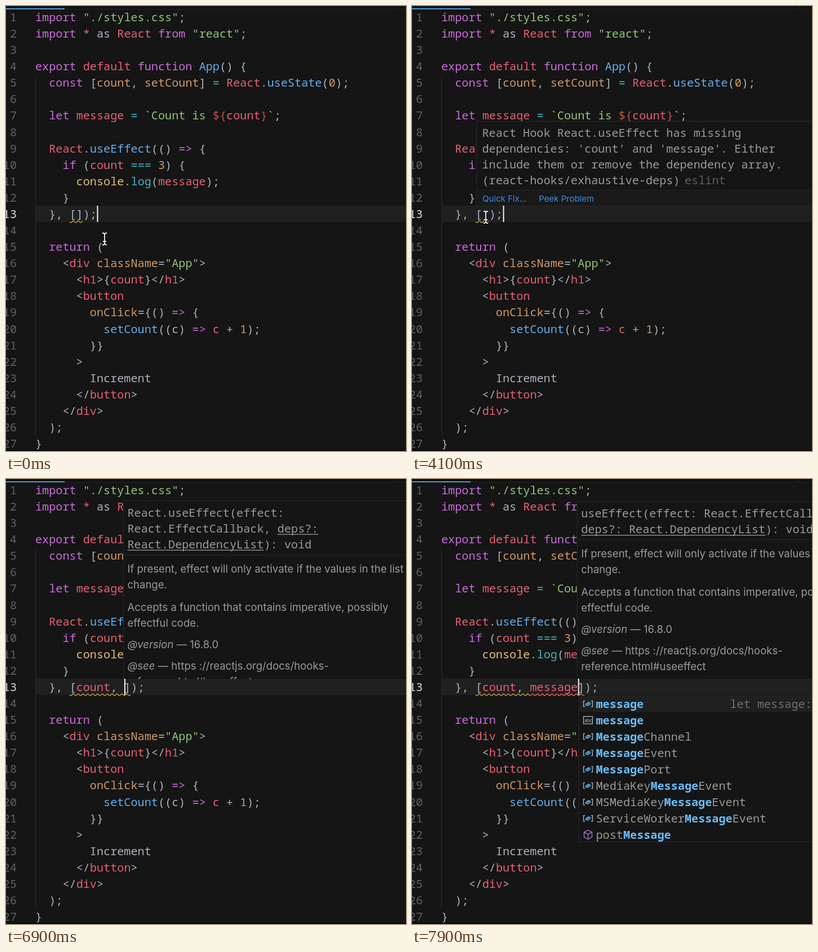
These frames come from a looping animation (710x789 px, 8 s). An HTML page with a canvas:

```html
<!DOCTYPE html>
<html lang="en">
<head>
<meta charset="utf-8">
<title>Effect dependencies</title>
<style>
html, body { margin: 0; width: 100%; height: 100%; overflow: hidden; background: #151515; }
canvas { display: block; }
</style>
</head>
<body>
<canvas id="stage"></canvas>
<script>
const W = 710, H = 789, LOOP = 8000;
const ADV = 12.11, ROW = 29.08, LEFT = 52, BASE = 27;
const MONO = '20.18px "Noto Sans Mono", monospace';
const SANS = '18.55px Inter, sans-serif';
const BG = '#151515', EDGE = '#272727', GRAY = '#9a9a9a';

const canvas = document.getElementById('stage');
const g = canvas.getContext('2d');
const dpr = window.devicePixelRatio || 1;
canvas.width = W * dpr;
canvas.height = H * dpr;
canvas.style.width = W + 'px';
canvas.style.height = H + 'px';

// First letter of each segment picks its colour.
const INK = {
  w: '#abb2bf', p: '#cb6bdd', r: '#e7606f', g: '#92c679', b: '#61afef',
  o: '#d19a66', y: '#e5c07b', c: '#42b7c3', d: '#be5046'
};
const CODE = [
  'pimport |g"./styles.css"|w;',
  'pimport |r* |was |rReact |pfrom |g"react"|w;',
  '',
  'pexport |rdefault |pfunction |bApp|w() {',
  'p  const |w[|ocount|w, |osetCount|w] |c= |rReact|w.|buseState|w(|o0|w);',
  '',
  'p  let |rmessage |c= |g`Count is |d${|rcount|d}|g`|w;',
  '',
  'r  React|w.|buseEffect|w(() |p=> |w{',
  'p    if |w(|rcount |c=== |o3|w) {',
  'y      console|w.|clog|w(|rmessage|w);',
  'w    }',
  '',
  '',
  'p  return |w(',
  'w    <|rdiv |oclassName|w=|g"App"|w>',
  'w      <|rh1|w>{|rcount|w}</|rh1|w>',
  'w      <|rbutton',
  'o        onClick|w={() |p=> |w{',
  'b          setCount|w((c) |p=> |rc |w+ |o1|w);',
  'w        }}',
  'w      >',
  'w        Increment',
  'w      </|rbutton|w>',
  'w    </|rdiv|w>',
  'w  );',
  'w}'
];

const TYPED = 'count, message';
const KEYS = [5600, 5800, 5900, 6050, 6150, 6450, 6600, 7000, 7150, 7400, 7500, 7600, 7700, 7850];
const CLICK = 4300, TIP_ON = 700, FIRST = 6;

// Leading mark: nothing = variable, # = plain word, * = function or module.
const C_LIST = ('count #count console *confirm ConstantSourceNode ConvolverNode CountQueuingStrategy ' +
  'Comment CompositionEvent caches *clearInterval closed').split(' ');
const ME_LIST = ('message menubar #message *memo MediaDeviceInfo MediaDevices MediaElementAudioSourceNode ' +
  'MediaEncryptedEvent MediaError MediaKeyMessageEvent MediaKeySession MediaKeyStatusMap').split(' ');
const MESSAGE_LIST = ('message #message MessageChannel MessageEvent MessagePort MediaKeyMessageEvent ' +
  'MSMediaKeyMessageEvent ServiceWorkerMessageEvent *postMessage').split(' ');

const colX = col => LEFT + col * ADV;
const rowY = line => BASE + (line - 1) * ROW;

function text(s, x, y, color, font = MONO) {
  g.font = font;
  g.fillStyle = color;
  g.fillText(s, x, y);
}

function rect(x, y, w, h, color) {
  g.fillStyle = color;
  g.fillRect(x, y, w, h);
}

function panel(x, top, bottom) {
  rect(x, top, W - x, bottom - top, BG);
  g.strokeStyle = EDGE;
  g.lineWidth = 1.2;
  g.strokeRect(x + 0.5, top + 0.5, W - x + 10, bottom - top - 1);
}

function segments(line, y) {
  let x = LEFT;
  for (const part of line.split('|')) {
    text(part.slice(1), x, y, INK[part[0]]);
    x += (part.length - 1) * ADV;
  }
}

function squiggle(from, to, color) {
  g.strokeStyle = color;
  g.lineWidth = 1.3;
  g.beginPath();
  for (let x = from; x <= to; x++) {
    g.lineTo(x, 382.6 + 1.5 * Math.sin((x - 113) * Math.PI / 4.3));
  }
  g.stroke();
}

function editor(typed) {
  rect(0, 0, W, H, BG);
  rect(0, 0, W, 5, '#111');
  rect(0, 5, W, 1, '#262626');
  rect(687, 0, 1, 5, '#262626');
  rect(0, 4, 104, 2, '#4f9bdc');
  rect(LEFT, 354, W - LEFT, 29, '#202020');
  rect(LEFT, 122, 1, 640, '#2b2b2b');
  rect(0, 787, W, 2, '#0a0809');

  CODE.forEach((line, i) => {
    const n = i + 1;
    const label = String(n);
    text(label, 19 - label.length * ADV, rowY(n), n === 13 ? '#dcdcdc' : '#5f6164');
    if (line) segments(line, rowY(n));
  });
  const [first, second] = typed.split(',');
  let line = 'w  }, [';
  if (first) line += '|r' + first;
  if (second !== undefined) line += '|w,|r' + second;
  segments(line + '|w]);', rowY(13));

  squiggle(113, colX(FIRST + typed.length + 1), '#d6a444');
  if (typed.length > 7) squiggle(colX(13), colX(FIRST + typed.length), '#ee4444');
}

function tooltip() {
  panel(114, 204, 355);
  rect(115, 327, W - 115, 27, '#191919');
  rect(115, 326, W - 115, 1, '#222');
  [
    'React Hook React.useEffect has missing',
    "dependencies: 'count' and 'message'. Either",
    'include them or remove the dependency array.',
    '(react-hooks/exhaustive-deps)'
  ].forEach((s, i) => text(s, 124.5, 232 + i * 28.1, GRAY));
  text('eslint', 484, 316.3, '#5d5d5d');
  const link = '15px Inter, sans-serif';
  text('Quick Fix...', 125, 346.5, '#3b8eea', link);
  text('Peek Problem', 225, 346.5, '#3b8eea', link);
}

function underlined(s, x, y) {
  text(s, x, y, GRAY);
  rect(x, y + 3, s.length * ADV, 1.3, GRAY);
}

function tagged(tag, rest, x, y) {
  text(tag, x, y, GRAY, 'italic ' + SANS);
  const w = g.measureText(tag).width;
  text(rest, x + w, y, GRAY, SANS);
}

function hint(x, long) {
  const top = long ? 38 : 40;
  const tx = x + 7.5;
  panel(x, top, 356);
  g.save();
  g.beginPath();
  g.rect(x, top, W - x, 355 - top);
  g.clip();
  if (long) {
    text('React.useEffect(effect:', tx, 66.5, GRAY);
    text('React.EffectCallback, ', tx, 94.5, GRAY);
    underlined('deps?:', tx + 22 * ADV, 94.5);
    underlined('React.DependencyList', tx, 122.5);
    text('): void', tx + 20 * ADV, 122.5, GRAY);
  } else {
    text('useEffect(effect: React.EffectCallback,', tx, 68, GRAY);
    underlined('deps?: React.DependencyList', tx, 96);
    text('): void', tx + 27 * ADV, 96, GRAY);
  }
  const y = long ? 166 : 139;
  rect(x, y - 32, W - x, 1, EDGE);
  text('If present, effect will only activate if the values in the list', tx, y, GRAY, SANS);
  text('change.', tx, y + 28, GRAY, SANS);
  text('Accepts a function that contains imperative, possibly', tx, y + 67.5, GRAY, SANS);
  text('effectful code.', tx, y + 95.5, GRAY, SANS);
  tagged('@version', ' — 16.8.0', tx, y + 133.5);
  tagged('@see', ' — https ://reactjs.org/docs/hooks-', tx, y + 171.5);
  text('reference.html#useeffect', tx, y + 199.5, GRAY, SANS);
  g.restore();
}

function poly(points, color, fill) {
  g.beginPath();
  points.forEach(([x, y]) => g.lineTo(x, y));
  if (fill) {
    g.closePath();
    g.fillStyle = color;
    g.fill();
  } else {
    g.strokeStyle = color;
    g.lineWidth = 1.4;
    g.stroke();
  }
}

function icon(kind, x, y) {
  g.save();
  g.translate(x, y);
  if (kind === '#') {
    g.strokeStyle = '#b5b5b5';
    g.lineWidth = 1.3;
    g.strokeRect(-8, -6.5, 16, 13);
    text('abc', -6.2, 3, '#c5c5c5', '8px Inter, sans-serif');
  } else if (kind === '*') {
    poly([[0, -8], [7, -4.5], [7, 4], [0, 8], [-7, 4], [-7, -4.5], [0, -8]], '#a673cf');
    poly([[-7, -4.5], [0, -1], [7, -4.5]], '#a673cf');
    poly([[0, -1], [0, 8]], '#a673cf');
  } else {
    poly([[-5.5, -5], [-8, -5], [-8, 5], [-5.5, 5]], '#b0b0b0');
    poly([[5.5, -5], [8, -5], [8, 5], [5.5, 5]], '#b0b0b0');
    poly([[-5, 0], [1, -3.5], [5, -2], [5, 0.5], [-1, 4], [-5, 2.5]], '#5fb0ee', true);
    poly([[-4.5, 0.2], [-1, 1.2], [4.5, -1.6]], '#20517a');
  }
  g.restore();
}

function suggest(x, word) {
  let list = C_LIST;
  if (word[0] === 'm') list = word.length > 2 ? MESSAGE_LIST : ME_LIST;
  else list = list.filter(s => s.replace(/^[#*]/, '').toLowerCase().startsWith(word));
  panel(x, 384, 384 + list.length * 29.05 - 1.5);
  rect(x + 1, 385, W - x, 28, '#202020');
  if (list === ME_LIST) rect(x + 1, 442.5, W - x, 28.5, '#222');

  list.forEach((item, i) => {
    const kind = /[#*]/.test(item[0]) ? item[0] : '';
    const name = item.slice(kind.length);
    const y = 399 + i * 29.03;
    const at = Math.max(0, name.toLowerCase().lastIndexOf(word));
    const hit = list === ME_LIST ? 0 : at;
    const end = hit + word.length;
    const tx = x + 31;
    icon(kind, x + 17, y - 0.5);
    text(name.slice(0, hit), tx, y + 7, GRAY);
    text(name.slice(hit, end), tx + hit * ADV, y + 7, '#68bcf6', '600 ' + MONO);
    text(name.slice(end), tx + end * ADV, y + 7, GRAY);
  });
  const detail = word[0] === 'm' ? 'let message: string' : 'const count: number';
  text(detail, x + 269, 406, '#707070');
}

function pointer(x, y) {
  const shape = new Path2D();
  shape.moveTo(x - 4, y - 10.5);
  shape.quadraticCurveTo(x, y - 10.5, x, y - 7.5);
  shape.quadraticCurveTo(x, y - 10.5, x + 4, y - 10.5);
  shape.moveTo(x, y - 8);
  shape.lineTo(x, y + 8);
  shape.moveTo(x - 4, y + 10.5);
  shape.quadraticCurveTo(x, y + 10.5, x, y + 7.5);
  shape.quadraticCurveTo(x, y + 10.5, x + 4, y + 10.5);
  shape.moveTo(x - 3, y + 4.5);
  shape.lineTo(x + 3, y + 4.5);
  g.strokeStyle = '#111';
  g.lineWidth = 4;
  g.stroke(shape);
  g.strokeStyle = '#f4f4f4';
  g.lineWidth = 1.8;
  g.stroke(shape);
}

function draw(t) {
  const count = KEYS.filter(k => t >= k).length;
  const typed = TYPED.slice(0, count);
  const word = typed.split(', ').pop();
  const col = t < CLICK ? 9 : FIRST + count;
  const x = colX(col);

  editor(typed);
  if (t >= TIP_ON && t < CLICK) tooltip();
  if (count > 6) hint(x - 1.5 + (word === 'me' ? 2.5 : 0), t < KEYS[7]);
  if (t >= 5750 && word && !word.includes(',')) suggest(x + 1.3, word);

  if (t >= KEYS[0] || (t + 200) % 1000 < 500) rect(x + 0.5, 354, 2, 29, '#f5f5f5');
  if (t < KEYS[0]) {
    const k = Math.min(1, Math.max(0, (t - 100) / 350));
    const e = k * k * (3 - 2 * k);
    pointer(175 - 44 * e, 413 - 38.5 * e);
  }
}

const start = performance.now();
function tick() {
  g.setTransform(dpr, 0, 0, dpr, 0, 0);
  draw((performance.now() - start) % LOOP);
  requestAnimationFrame(tick);
}
tick();
</script>
</body>
</html>
```
